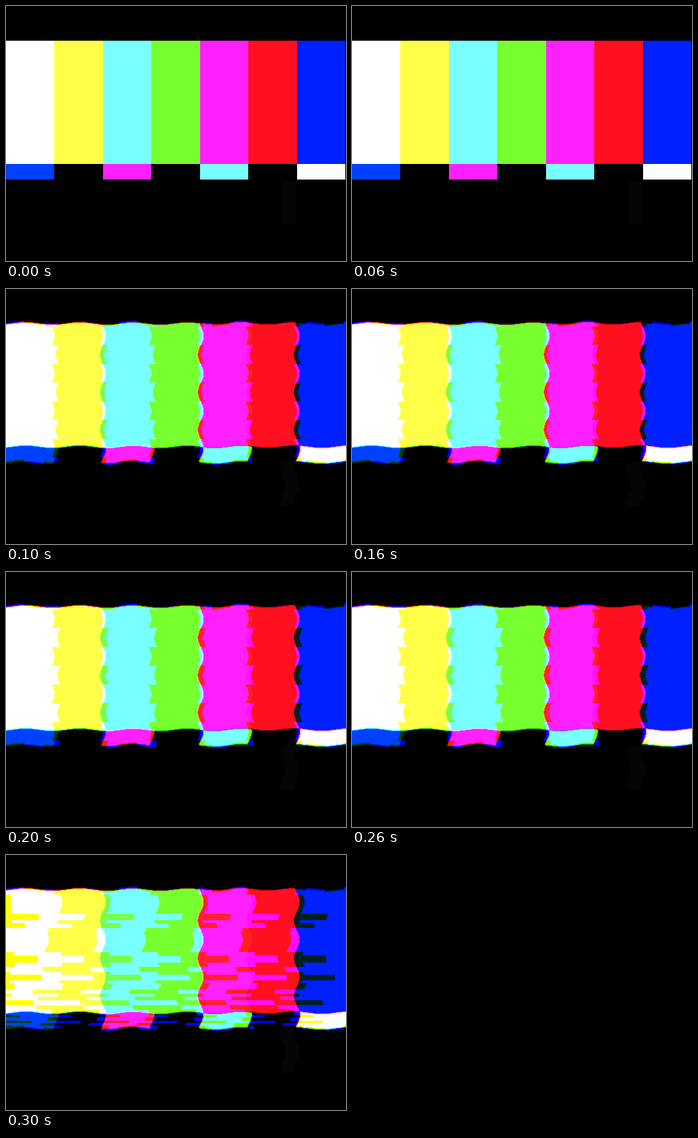
Animation of 480x360 px, one loop 0.4 s. Source, as an HTML page with a canvas:

```html
<!DOCTYPE html>
<html lang="en">
<head>
<meta charset="utf-8">
<title>Colour bars</title>
<style>
  html, body { margin: 0; width: 100%; height: 100%; overflow: hidden; background: #000; }
  canvas { display: block; width: 100vw; height: 100vh; }
</style>
</head>
<body>
<canvas id="screen" width="480" height="360"></canvas>
<script>
const W = 480, H = 360, STEP = 100, CELL = 26.5;
const BLACK = [0, 0, 0];
const rgb = hex => [hex >> 16, hex >> 8 & 255, hex & 255];
const bars = [0xffffff, 0xffff48, 0x78ffff, 0x78ff30, 0xff20ff, 0xff1020, 0x0020ff].map(rgb);
const strip = [0x0040ff, 0, 0xff20ff, 0, 0x78ffff, 0, 0xffffff].map(rgb);
const pluge = [5, 5, 5];

function pattern(x, y) {
  if (x < 0 || x >= 479) return BLACK;
  const bar = Math.min(6, Math.floor(x / 68.45));
  if (y >= 49 && y < 223) return bars[bar];
  if (y >= 223 && y < 245) return strip[bar];
  if (y >= 247 && y < 308 && x >= 390 && x < 410) return pluge;
  return BLACK;
}

// Blue tearing: start row and sideways shift of each band
const tears = [
  [0, 0], [53, -3], [56, 7], [83, 46], [92, 8], [96, 27], [103, -8], [108, -12],
  [137, 12], [142, 45], [152, 12], [158, -18], [165, 6], [169, 50], [177, 4],
  [181, 12], [190, -28], [196, 8], [200, -20], [205, 38], [212, -28], [218, -8],
  [226, 20], [229, -12], [234, 36], [237, -20], [241, 10], [246, 0]
];
const tearAt = y => tears.findLast(([top]) => y >= top)[1];

const odd = v => Math.floor(v / CELL) % 2 === 1;
const clampX = x => Math.max(0, Math.min(W - 2, x));

// Each channel is displaced by a shared ripple; blue also jumps from cell to cell
const looks = [
  null,
  { right: 6, left: -4, tear: false },
  { right: 8, left: -4, tear: false },
  { right: 0, left: 0, tear: true }
];

function sample(look, channel, x, y) {
  if (!look) return pattern(x, y)[channel];
  let dx = 4 * Math.sin(Math.PI * y / CELL);
  let dy = -1.7 * Math.cos(2 * Math.PI * (x - 28) / 76);
  if (channel === 0) dy -= 0.8;
  if (channel === 1) dx += 1;
  if (channel === 2) {
    dx += odd(y) ? look.right : look.left;
    dy += odd(x) ? 1.5 : -2.5;
    if (look.tear) {
      x -= tearAt(y);
      if (x < 0) return 0;
    }
  }
  const sx = clampX(x - dx), sy = y - dy;
  return (pattern(clampX(sx - 0.5), sy - 0.4)[channel] + pattern(clampX(sx + 0.5), sy - 0.4)[channel] +
          pattern(clampX(sx - 0.5), sy + 0.4)[channel] + pattern(clampX(sx + 0.5), sy + 0.4)[channel]) / 4;
}

function render(look) {
  const image = new ImageData(W, H);
  for (let y = 0, i = 0; y < H; y++) {
    for (let x = 0; x < W; x++, i += 4) {
      for (let c = 0; c < 3; c++) image.data[i + c] = sample(look, c, x + 0.5, y + 0.5);
      image.data[i + 3] = 255;
    }
  }
  return image;
}

const ctx = document.getElementById("screen").getContext("2d");
const pictures = looks.map(render);
const start = performance.now();

function draw() {
  const step = Math.floor((performance.now() - start) / STEP) % pictures.length;
  ctx.putImageData(pictures[step], 0, 0);
  requestAnimationFrame(draw);
}
draw();
</script>
</body>
</html>
```
